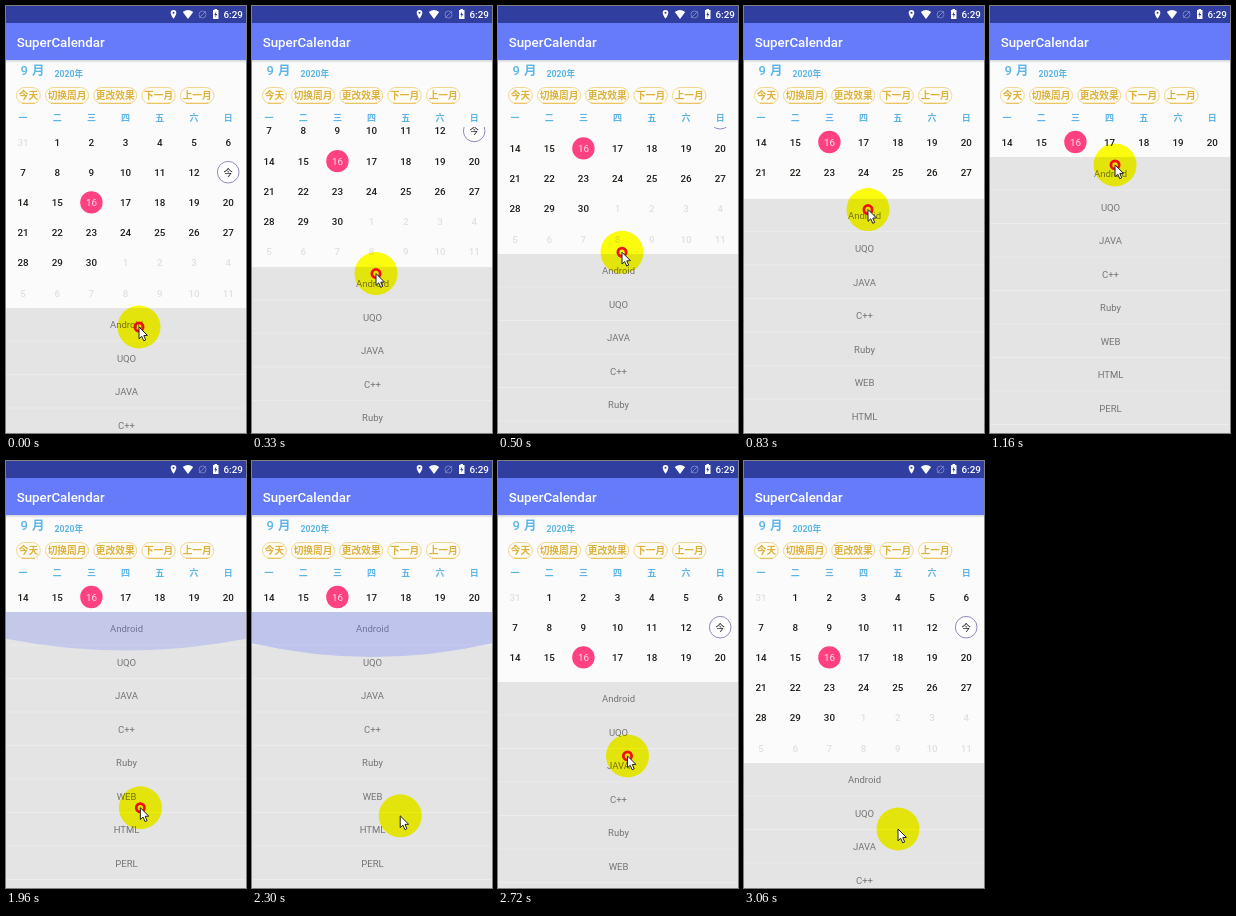
These frames come from a looping animation (240 by 427 pixels, 3.46 s). An HTML page with a canvas:

```html
<!DOCTYPE html>
<html lang="zh">
<head>
<meta charset="utf-8">
<title>SuperCalendar</title>
<style>
  html, body { margin: 0; width: 100%; height: 100%; overflow: hidden; background: #fbfbfb; }
  canvas { display: block; width: 100vw; height: 100vh; }
</style>
</head>
<body>
<canvas id="stage"></canvas>
<script>
const W = 240, H = 427, LOOP = 3460;
const ROBOTO = 'Roboto, sans-serif';
const CJK = '"Noto Sans CJK SC", "Noto Sans CJK", sans-serif';
const PAPER = '#fbfbfb', BLUE = '#5db5e6';
const LIST_MIN = 151, LIST_MAX = 302, ITEM = 33.5;
const ROW = 30.2, COLLAPSE = 2 * ROW;
const LANGUAGES = ['Android', 'UQO', 'JAVA', 'C++', 'Ruby', 'WEB', 'HTML', 'PERL', 'C'];
const BUTTONS = ['今天', '切换周月', '更改效果', '下一月', '上一月'];

// Three gestures, each shown in steps of a sixth of a second.
const STEP = 1000 / 6;
const COLLAPSE_DRAG = { start: 0, steps: 8 };
const SCROLL_DRAG = { start: 1465, steps: 6 };
const EXPAND_DRAG = { start: 2560, steps: 4 };
const GESTURES = [COLLAPSE_DRAG, SCROLL_DRAG, EXPAND_DRAG];

// Key points of the list edge (time, y) and of the pointer (time, x, y).
const EDGE = [[0, LIST_MAX], [330, 261], [500, 248], [830, 193], [1160, LIST_MIN],
  [2560, LIST_MIN], [2720, 219], [2890, 270], [3060, LIST_MAX]];
const POINTER = [[0, 133, 321], [330, 124, 268], [830, 124, 204], [1160, 125, 159], [1465, 127, 155],
  [1630, 131, 265], [2130, 136, 387], [2295, 148.5, 356.5], [2560, 126, 225], [2720, 129, 293.5], [3060, 154, 368]];

const canvas = document.getElementById('stage');
const ctx = canvas.getContext('2d');
const clamp = (v, min, max) => Math.min(max, Math.max(min, v));
const columnX = i => 17 + i * 34.2;

function sample(track, t) {
  const next = track.findIndex(key => key[0] > t);
  if (next < 0) return track[track.length - 1].slice(1);
  const a = track[next - 1], b = track[next];
  const k = (t - a[0]) / (b[0] - a[0]);
  return a.slice(1).map((v, i) => v + (b[i + 1] - v) * k);
}

function text(str, x, y, font, color, align = 'center') {
  ctx.font = font;
  ctx.fillStyle = color;
  ctx.textAlign = align;
  ctx.fillText(str, x, y);
}

function rect(x, y, w, h, color) {
  ctx.fillStyle = color;
  ctx.fillRect(x, y, w, h);
}

function paint(fill, stroke, width = 1) {
  if (fill) { ctx.fillStyle = fill; ctx.fill(); }
  if (stroke) { ctx.strokeStyle = stroke; ctx.lineWidth = width; ctx.stroke(); }
}

function circle(x, y, r, fill, stroke, width) {
  ctx.beginPath();
  ctx.arc(x, y, r, 0, Math.PI * 2);
  paint(fill, stroke, width);
}

function shape(path, fill, stroke) {
  const outline = new Path2D(path);
  ctx.fillStyle = fill;
  ctx.fill(outline);
  if (stroke) { ctx.strokeStyle = stroke; ctx.lineWidth = 1; ctx.stroke(outline); }
}

function drawStatusBar() {
  const bar = '#303f9f';
  rect(0, 0, W, 17, bar);
  shape('M164.7 6.8a2.8 2.8 0 0 1 5.6 0q0 2-2.8 6q-2.8-4-2.8-6z', '#fff');
  circle(167.5, 6.7, 1, bar);
  shape('M182 13L176.8 6Q182 2.2 187.2 6z', '#fff');
  circle(196.5, 8.5, 3.5, null, '#7480c2');
  ctx.beginPath();
  ctx.moveTo(193, 12);
  ctx.lineTo(200, 5);
  paint(null, '#7480c2');
  shape('M207 4h1.5v-1h2.5v1h1.5v9h-5.5z', '#fff');
  shape('M210.2 5.5l-1.9 3.5h1.2l-.3 2.5 2-3.5h-1.2z', bar);
  text('6:29', 217.5, 12.2, `500 9.8px ${ROBOTO}`, '#fff', 'left');
}

function drawButtons() {
  let x = 10;
  for (const label of BUTTONS) {
    const w = label.length * 9.6 + 5.6;
    ctx.beginPath();
    ctx.roundRect(x + .5, 81.5, w - 1, 16, 8);
    paint('#fffdf5', '#f0d690');
    rect(x + 6, 96.7, w - 12, 1.3, '#ebc565');
    text(label, x + w / 2, 93.2, `700 9.7px ${CJK}`, '#deb03c');
    x += w + 4.2;
  }
}

function drawHeader() {
  rect(0, 53, W, 68, PAPER);
  const shade = ctx.createLinearGradient(0, 53, 0, 57);
  shade.addColorStop(0, '#c6c6cc');
  shade.addColorStop(1, PAPER);
  rect(0, 53, W, 4, shade);
  rect(0, 17, W, 37, '#667bfa');
  drawStatusBar();
  text('SuperCalendar', 10.7, 40.8, `500 13.3px ${ROBOTO}`, '#fff', 'left');

  text('9', 14.5, 69, `500 13px ${ROBOTO}`, BLUE, 'left');
  text('月', 26, 69, `700 12.5px ${CJK}`, BLUE, 'left');
  text('2020', 48.5, 71.4, `700 8.7px ${ROBOTO}`, BLUE, 'left');
  text('年', 68.5, 71.4, `700 8.7px ${CJK}`, BLUE, 'left');
  drawButtons();
  [...'一二三四五六日'].forEach((day, i) => text(day, columnX(i), 115, `700 9px ${CJK}`, BLUE));
}

function drawDays(offset) {
  for (let i = 0; i < 42; i++) {
    const x = columnX(i % 7);
    const y = 136 + Math.floor(i / 7) * ROW + offset;
    const current = i >= 1 && i <= 30;
    const label = i === 0 ? 31 : current ? i : i - 30;
    if (i === 13) {
      circle(x, y, 10.8, '#fff', '#8f8bb8');
      text('今', x, y + 3.5, `500 9.3px ${CJK}`, '#222');
    } else if (i === 16) {
      circle(x, y, 11.2, '#ff4081');
      text(label, x, y + 3.5, `400 9.8px ${ROBOTO}`, '#ffe4ee');
    } else {
      text(label, x, y + 3.5, `500 9.8px ${ROBOTO}`, current ? '#1c1c18' : '#e0e0e0');
    }
  }
}

function drawGlow(strength) {
  const edge = LIST_MIN + 32 * strength;
  shape(`M0 ${LIST_MIN}V${edge}Q${W / 2} ${edge + 28 * strength} ${W} ${edge}V${LIST_MIN}z`,
    `rgba(100, 120, 250, ${.3 * strength})`);
}

function drawList(top, scroll, glow) {
  ctx.save();
  ctx.beginPath();
  ctx.rect(0, top, W, H - top);
  ctx.clip();
  rect(0, top, W, H - top, '#e4e4e4');
  LANGUAGES.forEach((name, i) => {
    const y = top - scroll + i * ITEM;
    rect(0, y + ITEM - 1, W, 1, '#ececec');
    text(name, 120.5, y + 20.3, `400 9.5px ${ROBOTO}`, '#747474');
  });
  if (glow > 0) drawGlow(glow);
  ctx.restore();
}

function drawPointer(x, y, pressed) {
  ctx.globalCompositeOperation = 'multiply';
  circle(x, y, 21.5, '#ffff0e');
  ctx.globalCompositeOperation = 'source-over';
  if (pressed) circle(x, y, 4.1, null, '#f01010', 2.8);
  shape(`M${x} ${y}v11.8l2.7-2.5 2 4.5 2-.9-1.9-4.3 3.6-.2z`, '#fff', '#222');
}

function draw(gesture, step) {
  const t = gesture.start + step * STEP;
  const [top] = sample(EDGE, t);
  const [x, y] = sample(POINTER, t);
  const lastStep = step === gesture.steps - 1;

  // Collapsing moves the month with the list; expanding reveals it first.
  const offset = gesture === COLLAPSE_DRAG
    ? Math.max(-COLLAPSE, top - LIST_MAX)
    : Math.min(0, top - LIST_MIN - COLLAPSE);
  // The scroll drag follows the pointer back to the first item, then overscrolls.
  const pull = gesture === SCROLL_DRAG ? y - 299 : 0;
  const pressed = gesture === COLLAPSE_DRAG || !(lastStep || (gesture === SCROLL_DRAG && step === 0));

  rect(0, 0, W, H, PAPER);
  drawDays(offset);
  drawHeader();
  drawList(top, clamp(-pull, 0, 40), clamp(pull / 57, 0, 1));
  drawPointer(x, y, pressed);
}

function resize() {
  const dpr = window.devicePixelRatio || 1;
  canvas.width = Math.round(innerWidth * dpr);
  canvas.height = Math.round(innerHeight * dpr);
  ctx.setTransform(canvas.width / W, 0, 0, canvas.height / H, 0, 0);
}

const start = performance.now();

function frame() {
  // Steps begin on the 10 ms mark before their exact time.
  const t = (performance.now() - start) % LOOP + 7;
  const gesture = GESTURES.findLast(g => g.start <= t);
  const step = Math.min(gesture.steps - 1, Math.floor((t - gesture.start) / STEP));
  draw(gesture, step);
  requestAnimationFrame(frame);
}

addEventListener('resize', resize);
resize();
frame();
</script>
</body>
</html>
```
